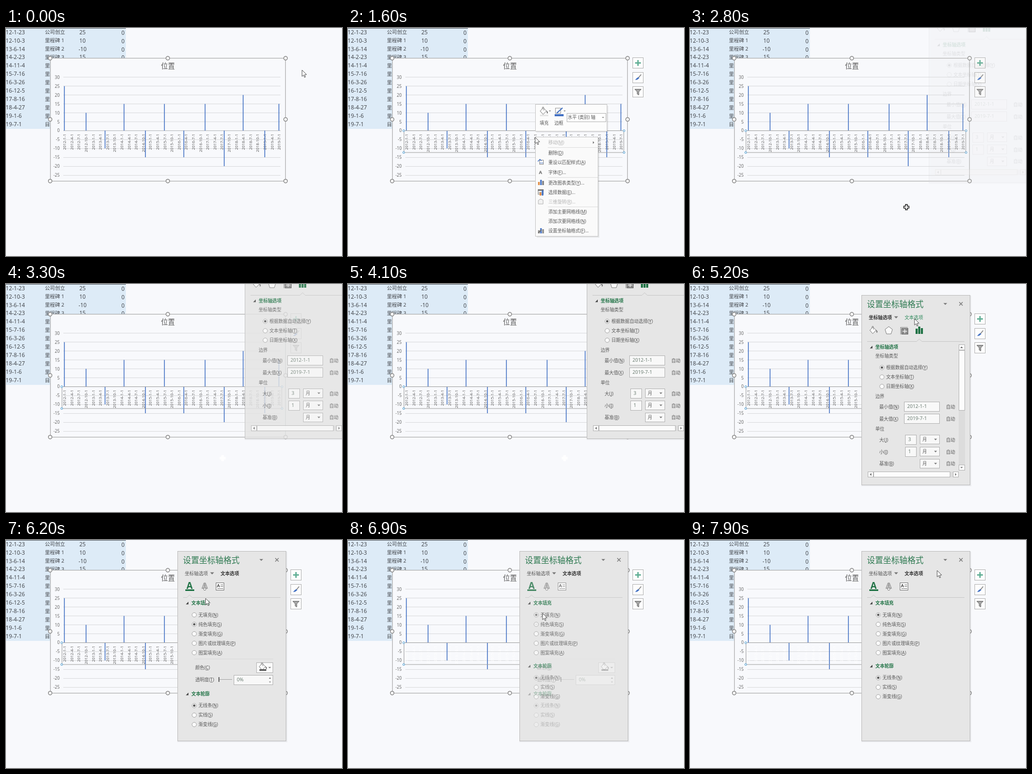
Write an HTML page with a canvas that moves like this. It is 639x434 px and loops after 8 s.

```html
<!DOCTYPE html>
<html lang="zh-CN">
<head>
<meta charset="utf-8">
<style>
html, body { margin: 0; width: 100%; height: 100%; overflow: hidden; background: #f8f9fc; }
canvas { display: block; }
</style>
</head>
<body>
<canvas id="stage" width="639" height="434"></canvas>
<script>
const g = document.getElementById('stage').getContext('2d');
const LOOP = 8000, STEP = 100;
const FONT = '"Noto Sans","Noto Sans CJK SC","Noto Sans CJK",sans-serif';
const PAGE = '#f8f9fc', INK = '#585858', GREEN = '#217346', BLUE = '#4472c4', EDGE = '#b4b4b4', DIM = '#b4b4b4';

const clamp = v => Math.max(0, Math.min(1, v));
const ramp = (t, a, b) => clamp((t - a) / (b - a));
const lerp = (a, b, k) => a + (b - a) * k;

// "&" marks the underlined access key
function text(s, x, y, size = 8.6, color = INK, bold = false, align = 'left') {
  g.font = (bold ? 'bold ' : '') + size + 'px ' + FONT;
  g.fillStyle = color;
  g.textAlign = align;
  const base = y + size * 0.37, at = s.indexOf('&');
  if (at >= 0) {
    const x0 = x + g.measureText(s.slice(0, at)).width;
    s = s.replace('&', '');
    g.fillRect(x0, Math.round(base + 1), g.measureText(s[at]).width, 0.8);
  }
  g.fillText(s, x, base);
}

function box(x, y, r, b, fill, edge) {
  g.fillStyle = fill;
  g.fillRect(x, y, r - x, b - y);
  if (edge) {
    g.strokeStyle = edge;
    g.lineWidth = 1;
    g.strokeRect(x + 0.5, y + 0.5, r - x - 1, b - y - 1);
  }
}

function path(pts, fill, stroke, width = 1, close = true) {
  g.beginPath();
  for (let i = 0; i < pts.length; i += 2) g.lineTo(pts[i], pts[i + 1]);
  if (close) g.closePath();
  if (fill) { g.fillStyle = fill; g.fill(); }
  if (stroke) { g.strokeStyle = stroke; g.lineWidth = width; g.stroke(); }
}

const line = (x, y, r, b, color, width = 1) => path([x, y, r, b], null, color, width, false);

function dot(x, y, r, fill, stroke, width = 1) {
  g.beginPath();
  g.arc(x, y, r, 0, Math.PI * 2);
  if (fill) { g.fillStyle = fill; g.fill(); }
  if (stroke) { g.strokeStyle = stroke; g.lineWidth = width; g.stroke(); }
}

const down = (x, y, s = 3, c = '#777') => path([x - s, y - s / 2, x + s, y - s / 2, x, y + s / 2], c);
const right = (x, y, s = 2.5, c = '#666') => path([x - s / 2, y - s, x + s / 2, y, x - s / 2, y + s], c);

function faded(alpha, draw) {
  if (alpha <= 0) return;
  const old = g.globalAlpha;
  g.globalAlpha = old * alpha;
  draw();
  g.globalAlpha = old;
}

// ---------- sheet and chart ----------
const DATES = '12-1-23 12-10-3 13-6-14 14-2-23 14-11-4 15-7-16 16-3-26 16-12-5 17-8-16 18-4-27 19-1-6 19-7-1'.split(' ');
const BARS = [[111, 25], [152.3, 10], [188.4, -10], [224.5, 15], [265.2, -15], [301.3, 15],
  [338.2, -15], [378.6, 15], [415, -20], [451, 20], [492.2, -15], [519, 15]];
const level = v => 195.3 - v * 3.387;

function sheet() {
  box(0, 0, 228, 192, '#ddebf7');
  box(0, 0, 228, 1, '#5a5f66');
  DATES.forEach((d, i) => {
    const y = 7.8 + i * 15.95, c = '#44474c';
    text(d, -0.5, y, 10.4, c);
    text(i == 0 ? '公司创立' : i == 11 ? '目标' : '里程碑 ' + i, 74, y, 9.6, c);
    if (i < 4) {
      text('' + BARS[i][1], 145.5, y, 10.4, c, false, 'center');
      text('0', 225.5, y + 1, 10.4, c, false, 'right');
    }
  });
}

function axisDates(color) {
  for (let i = 0; i < 31; i++) {
    g.save();
    g.translate(111.5 + i * 13.6, 201.5);
    g.rotate(-Math.PI / 2);
    text(`${2012 + (i >> 2)}-${1 + i % 4 * 3}-1`, 0, 0, 7.5, color, false, 'right');
    g.restore();
  }
}

function chart(t) {
  box(84, 57, 533, 292, PAGE);
  for (let v = -25; v <= 30; v += 5) {
    const y = Math.round(level(v) - 0.3) + 0.5;
    line(109, y, 522, y, v ? '#dadbdd' : '#b5b7ba');
    text('' + v, 102, level(v) + 0.2, 8, '#666', false, 'right');
  }
  text('位置', 308, 72.3, 13.2, '#595959', false, 'center');
  axisDates(t >= 6800 ? '#fff' : '#626262');
  for (const [x, v] of BARS) line(x, level(0), x, level(v), BLUE, 1.5);

  g.strokeStyle = '#adadad';
  g.lineWidth = 1.2;
  g.strokeRect(84.5, 57.5, 447, 234);
  for (const x of [84, 307.7, 531.7])
    for (const y of [57.5, 174, 291.3])
      if (x != 307.7 || y != 174) dot(x, y, 3.4, '#fff', '#8c8c8c', 1.5);

  if (t >= 700) {
    g.strokeStyle = '#a0a0a0';
    g.lineWidth = 1;
    g.strokeRect(106.5, 195.5, 418, 41.5);
    for (const x of [106, 525]) for (const y of [195.5, 237]) dot(x, y, 1.8, '#fff', '#4a9bd0');
    sideButtons();
  }
}

function brush(x, y) {
  line(x + 6, y - 6, x + 1, y, '#8a8a8a', 1.8);
  path([x + 0.5, y - 1, x + 2.5, y + 1, x - 1.5, y + 4, x - 5.5, y + 4.5, x - 2.5, y + 1], BLUE);
}

function sideButtons() {
  for (const y of [56, 84, 111]) box(541, y, 562, y + 21, '#fdfdfd', EDGE);
  line(546, 66.5, 557, 66.5, '#5fae94', 2.6);
  line(551.5, 61, 551.5, 72, '#5fae94', 2.6);
  brush(551.5, 94.5);
  path([545.5, 116.5, 557.5, 116.5, 553, 121.5, 553, 127.5, 550, 125.5, 550, 121.5], '#a6a6a6', '#666');
}

// ---------- pop-ups ----------
const MENU = [['移动(&M)', 218], ['删除(&D)', 237.5], ['重设以匹配样式(&A)', 255.5], ['字体(&F)...', 274.5],
  ['更改图表类型(&Y)...', 294.5], ['选择数据(&E)...', 312.5], ['三维旋转(&R)...', 331],
  ['添加主要网格线(&M)', 350], ['添加次要网格线(&N)', 368], ['设置坐标轴格式(&F)...', 386]];

function bars(x, y, colors) {
  colors.forEach((c, i) => {
    const h = [6, 10, 8][i];
    box(x - 5.5 + i * 4, y + 5 - h, x - 2.5 + i * 4, y + 5, c);
  });
}

function tip() {
  box(357, 222, 422, 240, '#fff', '#c4c4c4');
  text('水平 (类别) 轴', 361, 231, 8.4);
}

function menu(t, cy) {
  box(359, 210, 478, 399, 'rgba(0,0,0,.08)');
  box(356, 207, 476, 397, '#fafafa', '#c6c6c6');
  if (t >= 1900) {
    const hit = MENU.reduce((a, b) => Math.abs(b[1] - cy) < Math.abs(a[1] - cy) ? b : a);
    box(358, hit[1] - 9, 474, hit[1] + 9, '#dcdcdc');
  }
  for (const y of [227.5, 284.5, 340.5]) line(380, y, 475, y, '#dedede');
  MENU.forEach(([s, y], i) => text(s, 381, y, 8.6, i == 0 || i == 6 ? DIM : INK));
  right(467, 218);
  box(364, 251, 372, 260, '#fff', '#8a8a8a');
  path([361, 254, 365, 250, 368, 253], null, BLUE, 1.4, false);
  line(365, 257, 371, 257, BLUE);
  text('A', 363, 274.5, 9, '#666', true);
  bars(367, 294, ['#e0873c', BLUE, '#777']);
  box(361, 307, 372, 317, '#fff', '#8a8a8a');
  box(361, 307, 372, 310, '#777');
  for (const y of [312.5, 314.5]) line(361, y, 372, y, '#aaa');
  bars(370, 314, ['#e0873c', BLUE]);
  path([362, 328, 366, 325.5, 371, 327.5, 371, 335, 362, 335], '#f2f2f2', DIM);
  bars(367, 386, ['#888', BLUE, '#888']);
  line(362, 390, 368, 384, '#666', 1.6);
}

function bucket(x, y) {
  path([x - 6.5, y, x - 0.5, y - 6, x + 5.5, y, x - 1, y + 6.5], '#fdfdfd', '#777');
  path([x - 3, y - 3.5, x - 2, y - 7.5, x, y - 7.5, x + 0.5, y - 1], null, '#888', 1, false);
  path([x + 5.5, y - 1, x + 8, y + 2, x + 7.5, y + 5, x + 6.2, y + 4], '#666');
}

function miniBar() {
  box(358, 148, 495, 199, 'rgba(0,0,0,.07)');
  box(356, 145, 493, 197, '#fcfcfc', '#c6c6c6');
  bucket(372, 158);
  box(365, 165, 381, 168, '#e6e6e6');
  box(394, 152, 405, 163, '#fdfdfd', '#9a9a9a');
  line(397, 162, 408, 152, BLUE, 2);
  box(393, 164, 410, 168, BLUE);
  down(384, 158, 2);
  down(412, 158, 2);
  text('填充', 373, 180.5, 8.6, INK, false, 'center');
  text('边框', 401, 180.5, 8.6, INK, false, 'center');
  box(416, 162, 491, 179, '#fff', EDGE);
  text('水平 (类别) 轴', 418, 170.3, 8.6);
  down(485, 170.5, 2.2);
}

// ---------- format pane, drawn at its resting place ----------
function radio(x, y, label, on) {
  dot(x, y, 4.2, '#fbfbfb', '#a6a6a6');
  if (on) dot(x, y, 2.3, '#5a5a5a');
  text(label, x + 8, y);
}

function section(s, y) {
  path([347, y - 2.5, 347, y + 2.5, 342, y + 2.5], '#444');
  text(s, 352.5, y, 8.7, GREEN, true);
}

function field(x, y, r, b, s) {
  box(x, y, r, b, '#f8f8f8', EDGE);
  text(s, x + 6, (y + b) / 2 - 0.5, 9.2, '#6b7d72');
}

function drop(y) {
  box(437, y, 475, y + 18, '#f8f8f8', EDGE);
  text('月', 442, y + 8.5);
  down(467, y + 9, 2.8);
}

function rule(notch) {
  path([337, 109.5, notch - 5, 109.5, notch, 104.5, notch + 5, 109.5, 522, 109.5], null, '#c8c8c8', 1, false);
}

function scrollbars() {
  box(511, 115, 523, 355, '#dcdcdc');
  box(511, 115, 523, 126, '#fafafa', EDGE);
  box(511, 126, 523, 241, '#fcfcfc', EDGE);
  box(511, 344, 523, 355, '#fafafa', EDGE);
  path([514, 122, 519, 122, 516.5, 119], '#666');
  down(516.5, 349.5, 2.5);
  box(338, 357, 511, 368, '#dcdcdc');
  box(338, 357, 349, 368, '#fafafa', EDGE);
  box(349, 357, 495, 368, '#fcfcfc', EDGE);
  box(500, 357, 511, 368, '#fafafa', EDGE);
  right(505.5, 362.5);
  path([345, 360, 345, 365, 342, 362.5], '#666');
}

function sizeIcon() {
  line(400.5, 82, 400.5, 96, '#888');
  line(400, 82.5, 414, 82.5, '#888');
  box(402, 84, 415, 96, '#8c8c8c', '#666');
  line(404, 90, 413, 90, '#fff', 1.2);
  line(408.5, 86, 408.5, 94, '#fff', 1.2);
}

function axisBody() {
  bucket(348.5, 88);
  path([378, 81, 385, 86.5, 382.3, 95, 373.7, 95, 371, 86.5], '#fafafa', '#808080');
  sizeIcon();
  box(429, 85, 433, 95, GREEN);
  box(434, 81, 438, 95, GREEN);
  box(439, 84, 443, 95, GREEN);
  rule(436);
  section('坐标轴选项', 120);
  text('坐标轴类型', 352.5, 136.5);
  ['根据数据自动选择(&Y)', '文本坐标轴(&T)', '日期坐标轴(&X)'].forEach((s, i) => radio(365, 159 + i * 18, s, !i));
  text('边界', 352.5, 213.5);
  text('最小值(&N)', 360, 233.5);
  field(407, 224, 475, 243, '2012-1-1');
  text('最大值(&X)', 360, 256.5);
  field(407, 247, 475, 266, '2019-7-1');
  text('单位', 352.5, 276);
  text('大(&J)', 360, 296.5);
  field(409, 287, 431, 306, '3');
  text('小(&I)', 360, 319.5);
  field(409, 310, 431, 329, '1');
  text('基准(&B)', 360, 342);
  [287, 310, 333].forEach(drop);
  [233.5, 256.5, 296.5, 319.5, 342].forEach(y => text('自动', 487, y));
  scrollbars();
}

function textBody(noFill) {
  text('A', 349, 86.5, 17, GREEN, true, 'center');
  box(341, 94, 358, 97, GREEN);
  g.font = 'bold 15px ' + FONT;
  g.textAlign = 'center';
  g.strokeStyle = '#777';
  g.lineWidth = 0.9;
  g.strokeText('A', 378, 92);
  dot(378, 93.5, 2.2, '#fff', '#777');
  box(399, 81, 415, 96, '#fff', '#777');
  text('A', 401, 87, 8.5, '#444', true);
  for (const y of [85.5, 88.5]) line(408, y, 413, y, '#777');
  line(402, 92.5, 413, 92.5, '#777');
  rule(349);
  section('文本填充', 120);
  ['无填充(&N)', '纯色填充(&S)', '渐变填充(&G)', '图片或纹理填充(&P)', '图案填充(&A)']
    .forEach((s, i) => radio(358, 142.5 + i * 18, s, i == (noFill ? 0 : 1)));
  if (!noFill) {
    line(358, 226.5, 508, 226.5, '#dadada');
    text('颜色(&C)', 360, 242.5);
    box(476, 233, 508, 253, '#fafafa', EDGE);
    bucket(488, 241);
    box(482, 246, 495, 249, '#555');
    down(501.5, 243, 2.6);
    text('透明度(&T)', 360, 265.5);
    line(404, 265.5, 430, 265.5, '#a6a6a6');
    box(404, 261, 406, 270, '#666');
    field(433, 257, 508, 276, '0%');
    path([500, 264, 504, 264, 502, 261.5], '#666');
    down(502, 270.5, 2);
  }
  const y = noFill ? 240 : 293;
  section('文本轮廓', y);
  ['无线条(&N)', '实线(&S)', '渐变线(&G)'].forEach((s, i) => radio(358, y + 22.3 + i * 18, s, !i));
}

function pane(t) {
  box(326, 22, 535, 385, 'rgba(0,0,0,.05)');
  box(326, 21, 533, 383, '#e6e6e6', '#bcbcbc');
  text('设置坐标轴格式', 336.5, 38.4, 15.4, '#2f7a52');
  down(485.5, 38, 3.6);
  line(512, 34.5, 518.5, 41, '#777', 1.2);
  line(518.5, 34.5, 512, 41, '#777', 1.2);
  const onText = t >= 5500;
  text('坐标轴选项', 340, 63.5, 8.8, onText ? INK : '#333', !onText);
  down(392, 63.5, 3.8);
  text('文本选项', 408, 63.5, 8.8, onText ? '#333' : t >= 5000 ? '#2e8a5c' : INK, onText);

  const toText = ramp(t, 5600, 6000), toNone = ramp(t, 6700, 7000);
  faded(1 - toText, axisBody);
  faded(toText * (1 - toNone), () => textBody(false));
  faded(toNone, () => textBody(true));
}

// ---------- pointer ----------
const TRACK = [[0, 563, 80], [100, 540, 105], [300, 400, 215], [400, 350, 244], [500, 356, 208],
  [1800, 356, 208], [2300, 405, 382], [2500, 405, 382], [2800, 411.5, 341], [2900, 411.5, 331],
  [3300, 561, -20], [3500, 561, -55], [4100, 561, -55], [4500, 433, 33], [4700, 433, 33],
  [5200, 427, 66], [5600, 427, 66], [6200, 379.5, 111], [6600, 370, 139.5], [7500, 370, 139.5], [7900, 470, 58]];

function pointer(t) {
  const i = TRACK.findIndex(k => k[0] > t);
  if (i < 0) return TRACK[TRACK.length - 1].slice(1);
  const [a, x, y] = TRACK[i - 1], [b, u, v] = TRACK[i], k = ramp(t, a, b);
  return [lerp(x, u, k), lerp(y, v, k)];
}

function arrow(x, y) {
  g.save();
  g.translate(x, y);
  path([0, 0, 0, 12.2, 2.8, 9.6, 4.8, 14, 6.6, 13.2, 4.7, 9, 8.6, 8.7], '#fff', '#555', 1);
  g.restore();
}

function cross(x, y, edge) {
  const a = 1.8, b = 5;
  g.save();
  g.translate(x, y);
  path([-a, -b, a, -b, a, -a, b, -a, b, a, a, a, a, b, -a, b, -a, a, -b, a, -b, -a, -a, -a], '#fff', edge, 1.4);
  g.restore();
}

function draw(t) {
  box(0, 0, 639, 434, PAGE);
  const [x, y] = pointer(t);
  sheet();
  chart(t);
  if (t < 1500) faded(ramp(t, 900, 1200), tip);
  if (t >= 1500 && t < 2600) {
    menu(t, y + 4);
    faded(ramp(t, 1400, 1600), miniBar);
  }
  if (t >= 3000 && t < 4500) cross(412, 331.5, '#fff');
  const drag = 1 - ramp(t, 4100, 4500);
  faded(Math.pow(ramp(t, 2600, 3400), 1.5), () => {
    g.save();
    g.translate(Math.round(128 * drag), Math.round(-88 * drag));
    pane(t);
    g.restore();
  });
  if (t >= 2600 && t < 3300 && x < 455) cross(x, y, '#222');
  else arrow(x, y);
}

const start = performance.now();
function tick() {
  const t = (performance.now() - start) % LOOP;
  draw(Math.floor(t / STEP) * STEP);
  requestAnimationFrame(tick);
}
tick();
</script>
</body>
</html>
```
